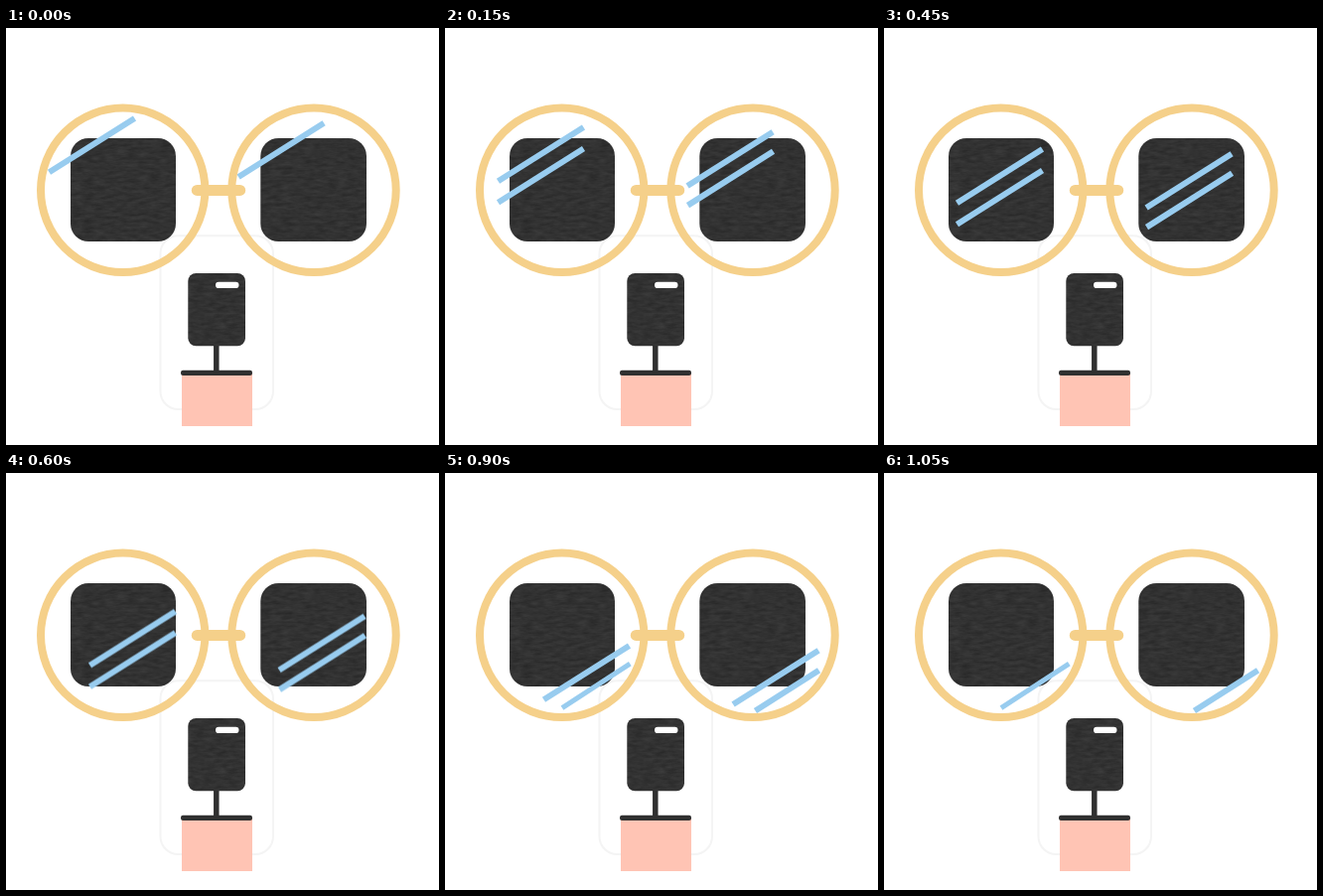
Write an HTML page that moves like this. It is 436x420 px and loops after 1.2 s.

```html
<!DOCTYPE html>
<html lang="en">
<head>
<meta charset="utf-8">
<title>Glasses</title>
<style>
  html, body { margin: 0; width: 100%; height: 100%; overflow: hidden; background: #fff; }
  svg { display: block; width: 436px; height: 420px; }
  .glint { stroke: #98ccef; stroke-width: 6; }
  .glint g, .tail { animation: 1200ms step-end infinite; }
  .glint .upper { animation-name: slide, upper; }
  .glint .lower { animation-name: slide, lower; }
  .tail { animation-name: tail; }

  @keyframes slide {
    0% { transform: translate(0, 0); }
    12.5% { transform: translate(10px, 9px); }
    25% { transform: translate(19.5px, 19.2px); }
    37.5% { transform: translate(30px, 31px); }
    50% { transform: translate(41px, 48.5px); }
    62.5% { transform: translate(41px, 65.3px); }
    75%, 100% { transform: translate(56px, 83px); }
  }
  @keyframes upper {
    0% { visibility: visible; }
    87.5%, 100% { visibility: hidden; }
  }
  @keyframes lower {
    0% { visibility: hidden; }
    12.5% { visibility: visible; }
    75%, 100% { visibility: hidden; }
  }
  @keyframes tail {
    0% { visibility: hidden; }
    75%, 100% { visibility: visible; }
  }
</style>
</head>
<body>
<svg viewBox="0 0 436 420">
  <defs>
    <filter id="grain" x="0" y="0" width="1" height="1" color-interpolation-filters="sRGB">
      <feTurbulence type="fractalNoise" baseFrequency=".09 .3" numOctaves="3" seed="4"/>
      <feColorMatrix values=".1 0 0 0 .145  .1 0 0 0 .145  .1 0 0 0 .145  0 0 0 0 1"/>
      <feComposite in2="SourceGraphic" operator="in"/>
    </filter>
    <path id="streak" d="M43.5 145.3 129.5 91"/>
  </defs>

  <rect x="155.5" y="209.3" width="113.5" height="174.7" rx="18" fill="none" stroke="#f4f4f4" stroke-width="2"/>

  <!-- Nose and mouth -->
  <path d="M177 348H248V401H177Z" fill="#ffc4b4"/>
  <path d="M211.8 318V347" stroke="#303030" stroke-width="5.5"/>
  <rect x="176" y="344.7" width="72" height="5.3" rx="2.2" fill="#303030"/>
  <rect x="183.3" y="247" width="57.7" height="73.3" rx="8" fill="#303030" filter="url(#grain)"/>
  <rect x="211" y="255.7" width="23.5" height="6.3" rx="3.1" fill="#fff"/>

  <!-- Eyes -->
  <g fill="#303030">
    <rect x="65" y="111" width="106" height="104" rx="18" filter="url(#grain)"/>
    <rect x="256.3" y="111" width="106.7" height="104" rx="18" filter="url(#grain)"/>
  </g>

  <!-- Reflections -->
  <g class="glint">
    <g class="upper">
      <use href="#streak"/>
      <use href="#streak" x="190.6" y="4.7"/>
    </g>
    <g class="lower">
      <use href="#streak" y="21.5"/>
      <use href="#streak" x="191" y="24.3"/>
    </g>
    <path class="tail" d="M118 236.7 186.3 192.2" stroke-width="5"/>
    <path class="tail" d="M312.5 239.5 376.5 198.8"/>
  </g>

  <!-- Frames -->
  <g fill="none" stroke="#f5d08a" stroke-width="8">
    <circle cx="117.7" cy="163.3" r="82.7"/>
    <circle cx="310" cy="163.3" r="82.7"/>
    <path d="M192.3 163.4H235.7" stroke-width="11" stroke-linecap="round"/>
  </g>
</svg>
</body>
</html>
```
